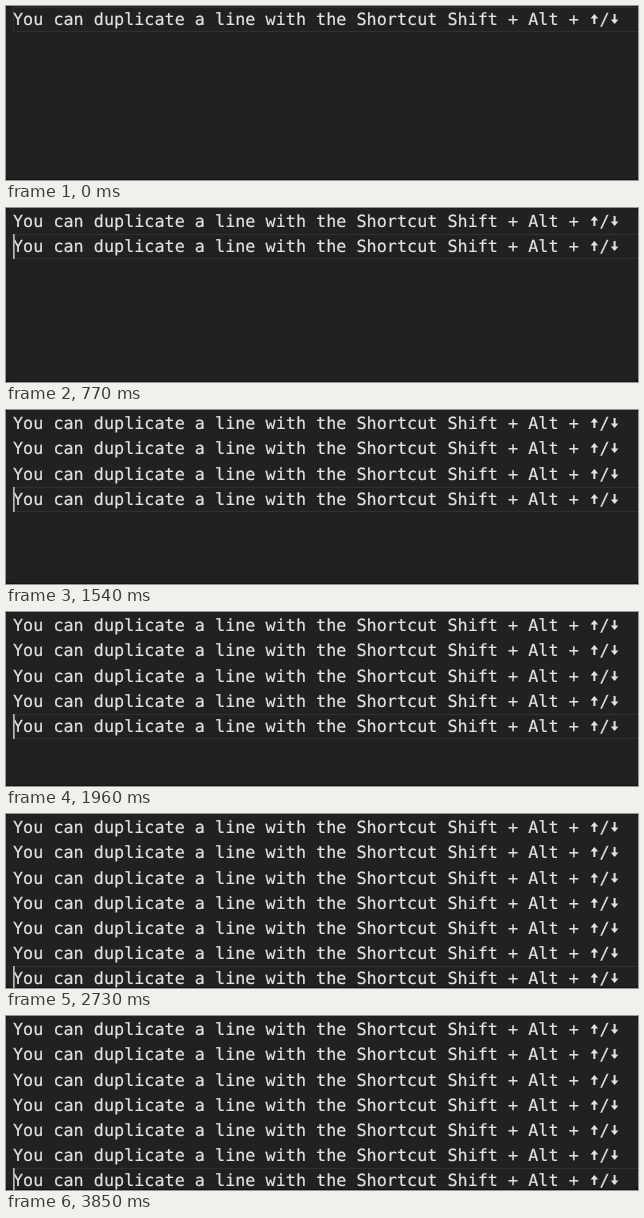
Recreate the animation shown at these times as an HTML page. Size 632 by 174 pixels, loop 3920 ms.

```html
<!DOCTYPE html>
<html lang="en">
<head>
<meta charset="utf-8">
<title>Duplicate a line</title>
<style>
  html, body { margin: 0; width: 100%; height: 100%; overflow: hidden; background: #141214; }
  svg { display: block; }
  text {
    font: 16.8px "DejaVu Sans Mono", Menlo, monospace;
    fill: #e3e3e3; stroke: #e3e3e3; stroke-width: .2;
    white-space: pre; text-rendering: geometricPrecision;
  }
</style>
</head>
<body>
<svg id="stage" width="632" height="174" viewBox="0 0 632 174">
  <rect width="632" height="173" rx="4" fill="#212121"/>
  <rect id="highlight" x="7.5" width="640" height="24" fill="none" stroke="#303030" stroke-width="1.2"/>
  <g id="lines"></g>
  <rect id="cursor" x="7" width="1.7" height="25" fill="#b9b9b9"/>
</svg>
<script>
const LOOP = 3920;
const COPY_TIMES = [770, 1190, 1540, 1960, 2380, 2730];
const CURSOR_OFF = [[0, 490], [3290, 3850]];
const CHAR = 10.114;
const LEFT = 7;
const SENTENCE = "You can duplicate a line with the Shortcut Shift + Alt + ";

const byId = id => document.getElementById(id);
const lineTop = row => Math.round(1.2 + 25.2 * row);

function add(parent, tag, attrs, content = "") {
  const node = document.createElementNS("http://www.w3.org/2000/svg", tag);
  for (const key in attrs) node.setAttribute(key, attrs[key]);
  node.textContent = content;
  parent.append(node);
  return node;
}

// Compact arrow with a solid head, centred in a character cell.
function addArrow(parent, column, flip) {
  const x = LEFT + (column + 0.5) * CHAR - 0.2;
  add(parent, "path", {
    d: "M0-5 L3.8-.6 H1 V5 H-1 V-.6 H-3.8Z",
    fill: "#e3e3e3",
    transform: `translate(${x} 13) scale(1 ${flip})`
  });
}

const lines = Array.from({ length: COPY_TIMES.length + 1 }, (_, row) => {
  const line = add(byId("lines"), "g", { transform: `translate(0 ${lineTop(row) - 1})` });
  const slash = SENTENCE.length + 1;
  add(line, "text", { x: LEFT, y: 19 }, SENTENCE);
  addArrow(line, slash - 1, 1);
  add(line, "text", { x: LEFT + slash * CHAR, y: 19 }, "/");
  addArrow(line, slash + 1, -1);
  return line;
});

function render(time) {
  const current = COPY_TIMES.filter(t => time >= t).length;
  const hidden = CURSOR_OFF.some(([from, to]) => time >= from && time < to);
  lines.forEach((line, row) => line.setAttribute("visibility", row <= current ? "visible" : "hidden"));
  byId("highlight").setAttribute("y", lineTop(current) + 0.5);
  byId("cursor").setAttribute("y", lineTop(current));
  byId("cursor").setAttribute("visibility", hidden ? "hidden" : "visible");
}

const start = performance.now();
function tick() {
  render((performance.now() - start) % LOOP);
  requestAnimationFrame(tick);
}
tick();
</script>
</body>
</html>
```
